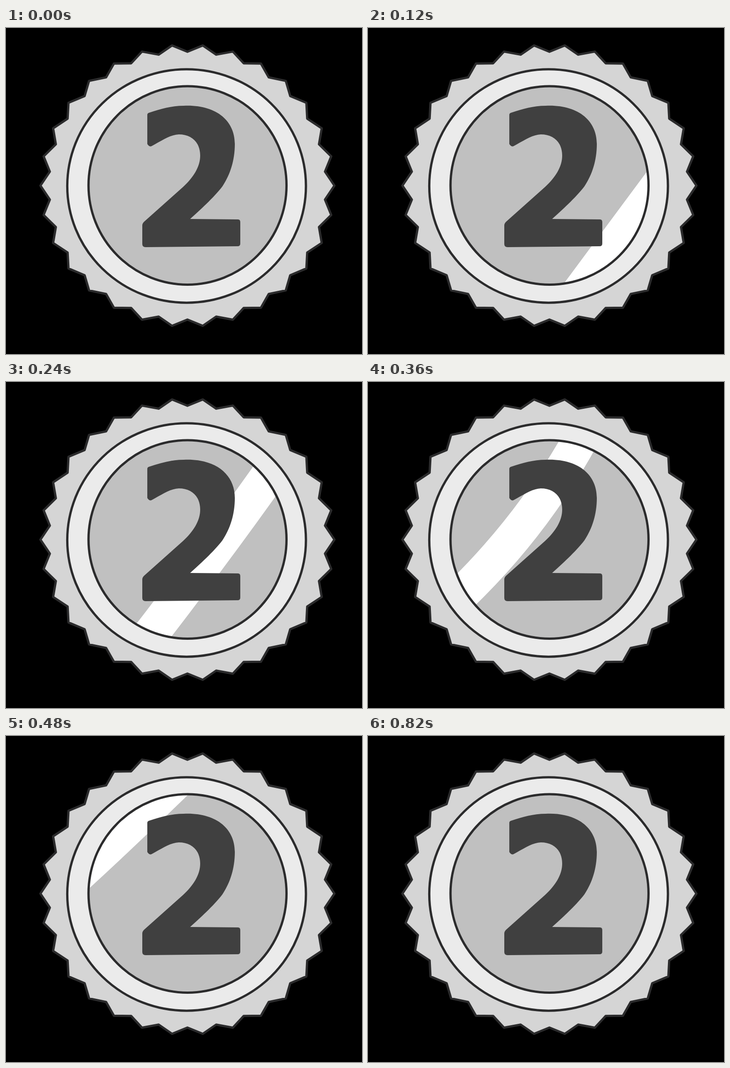
An HTML page that plays this animation: 781 px wide and 717 px high, repeating every 0.96 s.

```html
<!DOCTYPE html>
<html lang="en">
<head>
<meta charset="utf-8">
<title>Silver medal</title>
<style>
  html, body { margin: 0; width: 100%; height: 100%; overflow: hidden; background: #000; }
  svg { display: block; width: 100vw; height: 100vh; }
  .line { stroke: #2b2b2c; stroke-width: 5; stroke-linejoin: round; }
</style>
</head>
<body>
<svg viewBox="0 0 781 717">
  <defs>
    <ellipse id="disc" cx="398.2" cy="346.2" rx="217.2" ry="218.2"/>
    <clipPath id="face"><use href="#disc"/></clipPath>
  </defs>
  <polygon id="rim" class="line" fill="#d5d5d5"/>
  <ellipse class="line" cx="396.2" cy="347.5" rx="261.8" ry="256.7" fill="#ebebeb"/>
  <use href="#disc" fill="#c0c0c0"/>
  <g clip-path="url(#face)"><path id="shine" fill="#fff"/></g>
  <use href="#disc" class="line" fill="none"/>
  <path fill="#404040" d="M310 191Q310 187 315 186C340 178 362 171 390 171
    C460 168 502 203 502 255C502 291 492 322 475 348C462 366 430 397 404 420
    L509 421Q514 421 514 427V474Q514 480 508 480L306 482Q299 482 299 475V434
    Q299 430 303 426L388 350C411 329 426 305 426 281C426 252 408 234 379 234
    C360 235 343 247 319 260Q314 262 310 255Z"/>
</svg>
<script>
  const LOOP = 960, STEP = 120;
  const TEETH = 30;
  const BAND = 78, REACH = 230;

  const rim = document.getElementById("rim");
  const shine = document.getElementById("shine");

  // Tips and notches alternate on two concentric ellipses.
  function rimPoint(i) {
    const angle = i * Math.PI / TEETH;
    const [rx, ry] = i % 2 ? [303.5, 294.5] : [322.5, 310];
    return [398 + rx * Math.cos(angle), 346.7 + ry * Math.sin(angle)];
  }

  // The band sweeps from lower right to upper left, bowing on the way
  // and tilting as it slows down at the end.
  function draw(ms) {
    const step = Math.floor((ms % LOOP) / STEP);
    const ease = (step / 4) ** 8;
    const front = 286 - 132 * step + 8 * Math.min(ease, 1);
    const back = front + BAND;
    const turn = 36.5 + 10 * Math.min(ease, 1);
    const bow = 12 * Math.exp(-2 * (step - 3) ** 2);

    shine.setAttribute("transform", `translate(398 346) rotate(${turn})`);
    shine.setAttribute("d",
      `M${front - bow} ${-REACH}Q${front + 2 * bow} 0 ${front - bow} ${REACH}` +
      `H${back - bow}Q${back + 2 * bow} 0 ${back - bow} ${-REACH}Z`);
  }

  rim.setAttribute("points", Array.from({ length: 2 * TEETH }, (_, i) => rimPoint(i)).join(" "));

  const start = performance.now();
  function tick() {
    draw(performance.now() - start);
    requestAnimationFrame(tick);
  }
  tick();
</script>
</body>
</html>
```
